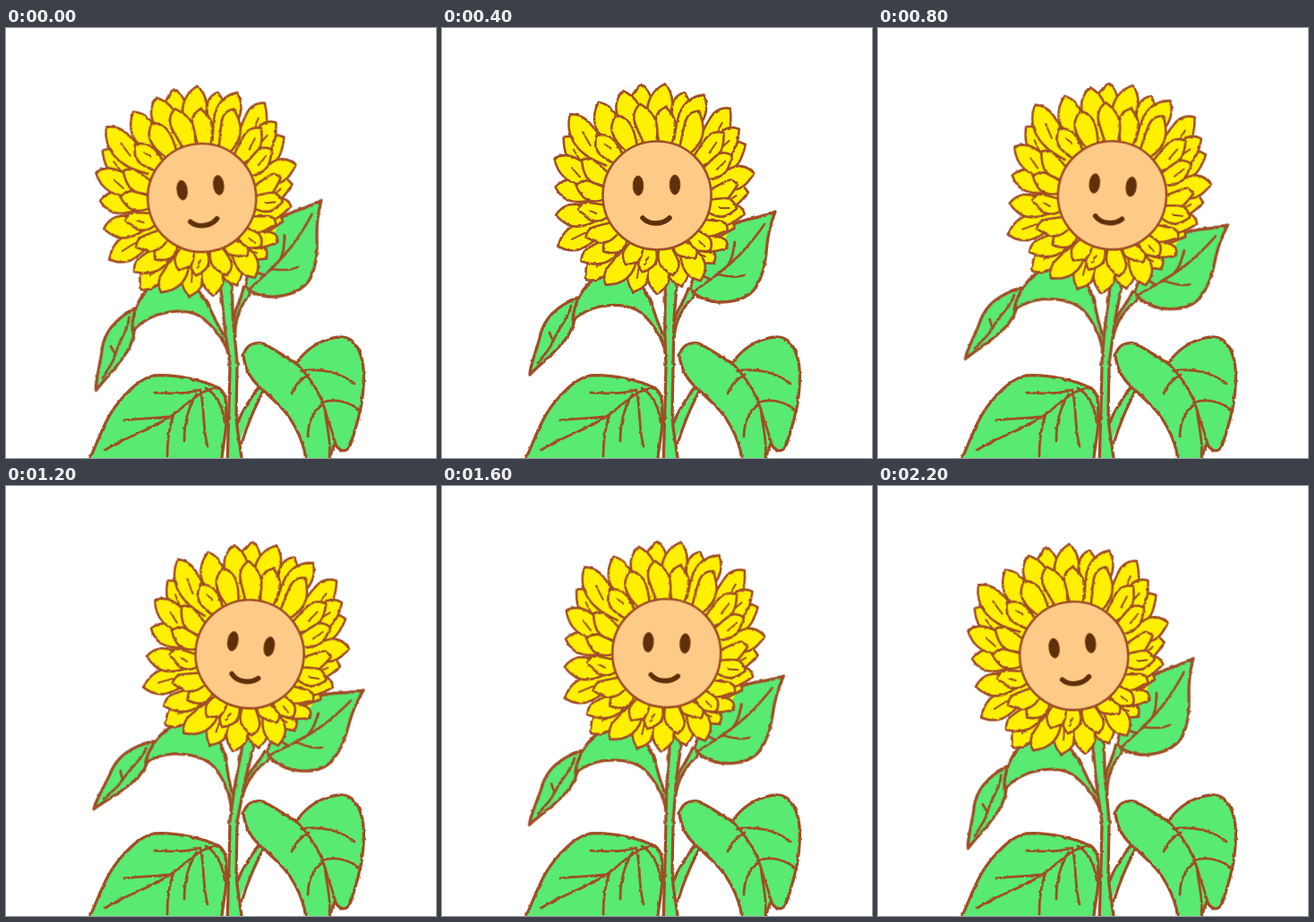
These frames come from a looping animation (480 by 480 pixels, 2300 ms). An HTML page:

```html
<!DOCTYPE html>
<html lang="en">
<head>
<meta charset="utf-8">
<title>Swaying sunflower</title>
<style>
  html, body { margin: 0; width: 100%; height: 100%; overflow: hidden; background: #fff; }
  svg { display: block; width: 100%; height: 100%; }
  path, circle { stroke: #a04e28; stroke-width: 3.3; stroke-linecap: round; stroke-linejoin: round; }
  .leaf { fill: #58ea72; }
  .line { fill: none; }
  .bare { stroke: none; }
  .vein { fill: none; stroke-width: 2.8; }
  .petal, .under { fill: #fff004; stroke-width: 2.6; }
  .crease { fill: none; stroke-width: 2; }
  .eye { fill: #5f300a; stroke: #7b4314; stroke-width: 1; }
  .smile { fill: none; stroke: #5f300a; stroke-width: 5.6; }

  /* 11 held poses each way, then one extra hold */
  #top { transform-origin: 252px 374px; animation: sway 2300ms infinite; }
  @keyframes sway {
    0% { transform: rotate(-6.55deg); animation-timing-function: steps(11, end); }
    47.82% { transform: rotate(11.45deg); animation-timing-function: steps(11, end); }
    95.65%, 100% { transform: rotate(-6.55deg); }
  }
</style>
</head>
<body>
<svg viewBox="0 0 480 480">
  <defs>
    <filter id="rough" filterUnits="userSpaceOnUse" x="0" y="0" width="480" height="520">
      <feTurbulence type="fractalNoise" baseFrequency=".16" numOctaves="2" seed="4"/>
      <feDisplacementMap in="SourceGraphic" scale="2.6" xChannelSelector="R" yChannelSelector="G"/>
    </filter>
    <clipPath id="floor"><path d="M0 0H480V480H0Z"/></clipPath>
  </defs>

  <g clip-path="url(#floor)">
    <g filter="url(#rough)">
      <!-- lower stem and right stalk -->
      <path class="leaf bare" d="M284 398C274 412 263 428 259 440L258 470C264 450 277 424 289 401Z"/>
      <path class="line" d="M284 398C274 412 263 428 259 440M289 401C278 424 270 440 263 464"/>
      <path class="leaf bare" d="M250 374L249 420L246 490H264L258 440L258 374Z"/>
      <path class="line" d="M250 376L249 420L247 490M258 376L257 430C257 450 262 465 264 490"/>

      <!-- lower left leaf -->
      <path class="leaf" d="M88 492C101 468 108 440 124 420C138 402 151 391 165 388C190 386 222 394 238 402C248 410 245 420 246 440C245 458 241 470 240 492Z"/>
      <path class="vein" d="M238 402C218 402 205 418 186 432C164 448 132 457 111 471M216 404C200 409 184 408 166 407M181 434C163 436 147 436 132 438M187 432C181 448 180 462 180 478M213 408C203 425 199 440 199 461M217 405C222 425 219 445 225 467M223 402C237 410 242 424 244 440"/>

      <!-- lower right leaf -->
      <path class="leaf" d="M265 366C267 355 276 350 286 352C300 358 313 369 324 374C334 360 347 351 361 347C377 342 387 346 393 358C401 374 400 392 398 411C396 432 389 449 385 464C381 474 374 475 367 464C364 470 361 478 360 492H336C335 474 331 460 322 444C313 427 301 418 287 404C274 394 267 381 265 366Z"/>
      <path class="vein" d="M324 374C338 389 350 407 355 423C360 440 365 452 368 465M329 383C351 379 375 385 389 397M338 387C328 393 321 400 319 408M352 418C368 413 384 417 396 428M354 420C342 429 337 440 337 457M356 426C358 446 363 460 361 478"/>
    </g>

    <g id="top">
      <g filter="url(#rough)">
        <!-- drooping left leaf -->
        <path class="leaf" d="M98 387C99 374 107 356 110 342C115 321 132 309 151 301C152 322 144 342 134 352C122 366 111 374 98 387Z"/>
        <path class="vein" d="M144 310C141 325 129 336 124 350C119 361 112 367 107 374M124 350L120 340"/>
        <path class="leaf" d="M146 326C147 311 153 296 165 284C178 271 205 268 219 284C231 295 235 312 240 326L249 348L250 370C249 352 240 336 227 322C214 308 192 308 176 311C163 314 153 320 146 326Z"/>

        <!-- right leaf -->
        <path class="leaf" d="M372 205C357 212 342 212 328 218L290 245L277 291C283 300 297 306 312 306C332 306 346 298 351 288C358 277 361 262 362 250C363 235 366 220 372 205Z"/>
        <path class="vein" d="M279 296C298 281 321 267 336 249C347 237 354 228 360 219M319 265C326 255 325 246 327 239M309 275C319 278 328 279 338 276M300 281L292 277"/>

        <!-- upper stem and stalk -->
        <path class="leaf bare" d="M275 291C269 308 261 314 259 326L258 350C258 329 270 314 281 299Z"/>
        <path class="line" d="M275 291C270 307 262 314 260 325M281 299C269 312 260 326 259 347"/>
        <path class="leaf bare" d="M249 280C250 305 248 325 249 348L250 379H258L259 325C260 310 262 298 262 280Z"/>
        <path class="line" d="M249 280C250 305 248 325 249 348L250 376M262 280C262 298 260 310 259 325L258 376"/>

        <g id="petals" transform="translate(240 187)"></g>
      </g>
      <circle cx="240" cy="187" r="60.5" fill="#fdcb87" style="stroke-width: 2.6"/>
      <ellipse class="eye" cx="219" cy="176" rx="5.8" ry="11"/>
      <ellipse class="eye" cx="260" cy="175" rx="5.8" ry="11"/>
      <path class="smile" d="M224 212C231 220 246 220 254 212"/>
    </g>
  </g>
</svg>

<script>
  const petals = document.getElementById('petals');

  let seed = 11;
  const rand = () => (seed = seed * 16807 % 2147483647) / 2147483647;
  const spread = n => (rand() - 0.5) * 2 * n;
  const rad = deg => deg * Math.PI / 180;

  // polar point: degrees clockwise from the top
  const at = (deg, r) =>
    `${(r * Math.sin(rad(deg))).toFixed(1)} ${(-r * Math.cos(rad(deg))).toFixed(1)} `;

  function add(tag, attrs) {
    const el = document.createElementNS('http://www.w3.org/2000/svg', tag);
    for (const key in attrs) el.setAttribute(key, attrs[key]);
    petals.append(el);
  }

  // tips on both sides lean towards the top
  function petal(tip, r, base, width) {
    const lean = spread(4) - 5 * Math.sin(rad(tip));
    const root = tip - lean;
    const mid = base + (r - base) * 0.6;
    const d = 'M' + at(root - width * 0.7, base)
      + 'C' + at(root - width * 1.15, mid) + at(tip - width * 0.95, r * 0.93) + at(tip, r)
      + 'C' + at(tip + width * 0.75, r * 0.91) + at(root + width * 1.15, mid) + at(root + width * 0.7, base);
    add('path', { class: 'petal', d });
    if (rand() < 0.4) {
      const from = base + (r - base) * 0.4;
      const to = base + (r - base) * (0.6 + rand() * 0.12);
      add('path', { class: 'crease', d: 'M' + at(root + spread(2), from) + 'L' + at(tip - lean * 0.4, to) });
    }
  }

  // outer tips: angle, radius
  const tips = [
    [4, 125], [15, 119], [25, 124], [40, 127], [51, 118], [60, 114], [77, 111],
    [88, 102], [102, 100], [113, 94], [127, 98], [140, 99], [153, 107], [165, 105],
    [180, 110], [194, 111], [210, 115], [220, 123], [229, 112], [243, 124], [259, 115],
    [275, 114], [290, 122], [302, 123], [313, 133], [328, 123], [342, 123], [352, 125]
  ];
  const order = tips.filter((_, i) => i % 2).concat(tips.filter((_, i) => i % 2 === 0));

  add('circle', { class: 'under bare', r: 90 });
  for (const [a, r] of order) petal(a, r, 66, 8.8);

  const inner = 20;
  for (let i = 0; i < inner; i++) {
    const a = i * 360 / inner + 8 + spread(3);
    petal(a, 94 + 7 * Math.cos(rad(a)) + spread(6), 58, 9);
  }
</script>
</body>
</html>
```
